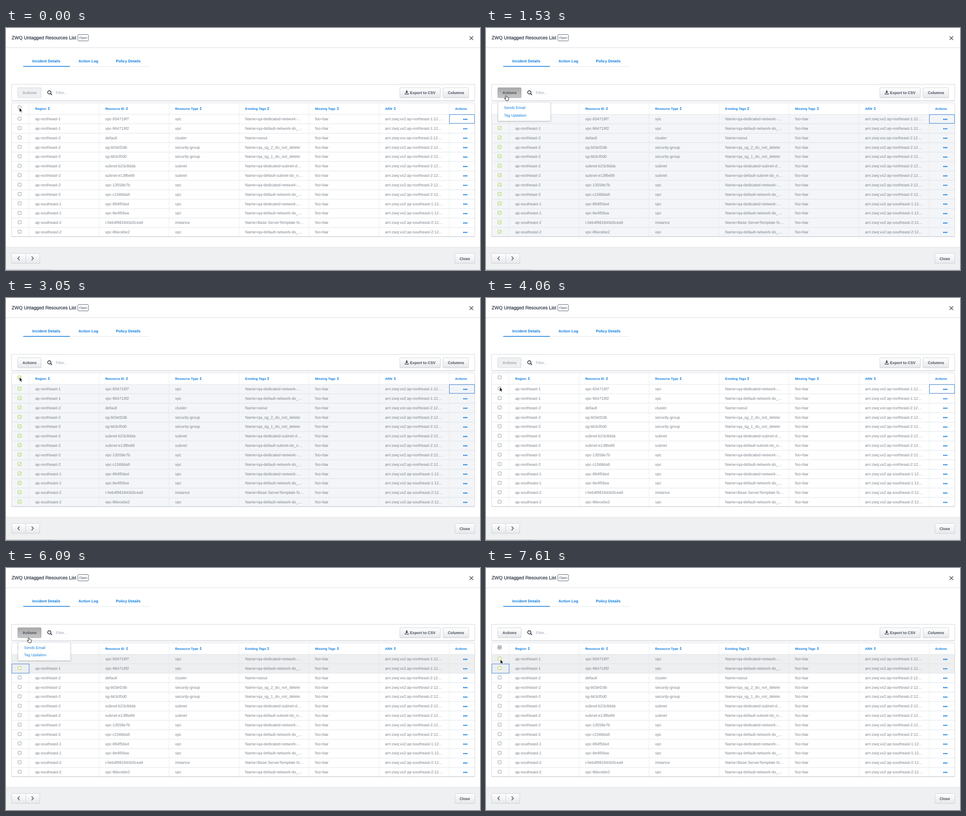
These frames come from a looping animation (1046 px wide and 535 px high, 8000 ms). An HTML page:

```html
<!DOCTYPE html>
<html lang="en">
<head>
<meta charset="utf-8">
<title>Untagged Resources</title>
<style>
html, body { margin: 0; width: 100%; height: 100%; overflow: hidden; background: #fff; }
svg { display: block; width: 100%; height: 100%; }
text { font: 8.67px "Liberation Sans", Arial, sans-serif; fill: #7b818a; text-rendering: geometricPrecision; }
.b { font-size: 8.4px; font-weight: bold; fill: #454d5a; }
.h { font-size: 7.2px; font-weight: bold; }
.blue { fill: #0a7be0; }
</style>
</head>
<body>
<svg id="stage" viewBox="0 0 1046 535">
<defs>
  <linearGradient id="raised" x2="0" y2="1"><stop stop-color="#fff"/><stop offset="1" stop-color="#e6e8eb"/></linearGradient>
  <linearGradient id="pressed" x2="0" y2="1"><stop stop-color="#a9a9aa"/><stop offset="1" stop-color="#c6c6c7"/></linearGradient>
  <filter id="shadow" x="-10%" y="-20%" width="120%" height="150%"><feDropShadow dx="0" dy="1" stdDeviation="1.5" flood-opacity=".22"/></filter>
</defs>
</svg>
<script>
const stage = document.getElementById('stage');
const TOP = 191, STEP = 20.83, LEFT = 12.5, RIGHT = 1034.5, COL = 154.4;
const BORDER = '#d3d7dc', BLUE = '#0a7be0', GREEN = '#96c83c';

const text = (x, y, s, attrs = '') => `<text x="${x}" y="${y}" ${attrs}>${s}</text>`;
const rect = (x, y, w, h, fill, stroke = 'none', attrs = '') =>
  `<rect x="${x}" y="${y}" width="${w}" height="${h}" fill="${fill}" stroke="${stroke}" ${attrs}/>`;
const path = (d, stroke, attrs = '') => `<path d="${d}" fill="none" stroke="${stroke}" ${attrs}/>`;
const button = (x, y, w, h = 22) =>
  rect(x, y + .6, w, h, '#c3c7cd', 'none', 'rx="1.5"') + rect(x, y, w, h, 'url(#raised)', '#cfd3d8', 'rx="1.5"');
const group = id => `<g id="${id}"></g>`;

const tags = {
  net: 'Name=qa-dedicated-network-…', def: 'Name=qa-default-network-do_…',
  sub: 'Name=qa-dedicated-subnet-d…', dsub: 'Name=qa-default-subnet-do_n…'
};
const rows = [
  ['northeast-1', 'vpc-934719f7', 'vpc', tags.net],
  ['northeast-1', 'vpc-964719f2', 'vpc', tags.def],
  ['northeast-2', 'default', 'cluster', 'Name=seoul', 'vxs'],
  ['northeast-2', 'sg-b03ef2db', 'security-group', 'Name=qa_sg_2_do_not_delete'],
  ['northeast-2', 'sg-bb3cf0d0', 'security-group', 'Name=qa_sg_1_do_not_delete'],
  ['northeast-2', 'subnet-b23c8dda', 'subnet', tags.sub],
  ['northeast-2', 'subnet-e13f8e89', 'subnet', tags.dsub],
  ['northeast-2', 'vpc-13558e7b', 'vpc', tags.net],
  ['northeast-2', 'vpc-c1568da9', 'vpc', tags.def],
  ['southeast-1', 'vpc-894f56ed', 'vpc', tags.net],
  ['southeast-1', 'vpc-8e4f56ea', 'vpc', tags.def],
  ['southeast-2', 'i-0eb4f981840d3cea9', 'instance', 'Name=Base ServerTemplate fo…'],
  ['southeast-2', 'vpc-86ecebe2', 'vpc', tags.def]
];
const headings = [['Region', 94.5], ['Resource ID', 267], ['Resource Type', 429.5],
  ['Existing Tags', 578.5], ['Missing Tags', 732.5], ['ARN', 858]];

function pageHeader() {
  return text(12.5, 25.4, 'ZWQ Untagged Resources List',
      'style="font-size:10.3px;fill:#333c4b;stroke:#333c4b;stroke-width:.3px"')
    + rect(158.5, 14.5, 23.5, 14, '#fff', '#5d6778', 'rx="2"')
    + text(161.6, 24.4, 'Open', 'style="font-size:7.2px;fill:#3f4858"')
    + path('M1023 18.5l8 8m0-8l-8 8', '#3f4858', 'stroke-width="1.3"')
    + path('M0 43.5H1046', '#d8dbdf')
    + ['Incident Details', 'Action Log', 'Policy Details'].map((s, i) =>
        text([58, 160, 242.5][i], 75.7, s, 'class="b blue"')).join('')
    + path('M38 85H317', '#e3e5e8') + path('M38 84.7H141', BLUE, 'stroke-width="1.5"');
}

function toolbar() {
  return rect(LEFT, 124.5, RIGHT - LEFT, 36.5, '#fff', BORDER)
    + path('M13 161H1034', '#c9cdd2') + group('actions')
    + '<circle cx="95.6" cy="142.2" r="3.6" fill="none" stroke="#3c4350" stroke-width="1.7"/>'
    + path('M98.2 144.8L101.4 148', '#3c4350', 'stroke-width="2"')
    + text(110, 146.2, 'Filter...', 'style="font-size:8.4px;fill:#a0a5ab"')
    + button(869, 132, 89.5) + text(891.5, 146.1, 'Export to CSV', 'class="b"')
    + '<path d="M883 138h2.6v3.4h2.2l-3.5 3.4l-3.5-3.4h2.2z" fill="#454d5a"/>'
    + path('M880.6 144v2.4h7.4v-2.4', '#454d5a', 'stroke-width="1.2"')
    + button(964.5, 132, 56.5) + text(975, 146.1, 'Columns', 'class="b"');
}

function table() {
  let s = group('bands') + path(`M${LEFT} 165.5H${RIGHT}V461.5H${LEFT}Z`, BORDER);
  for (let i = 0; i < 7; i++) {
    const x = i < 6 ? 51 + COL * i : 978;
    s += path(`M${x.toFixed(1)} 166V461`, '#e4e7ea', 'stroke-width=".8"');
  }
  headings.forEach(([name, x], i) => {
    s += text(64.5 + COL * i, 180.7, name, 'class="h blue"')
      + `<path d="M${x - 2.2} 177.4h4.4l-2.2-2.6zm0 1.6h4.4l-2.2 2.6z" class="blue"/>`;
  });
  s += text(991, 180.7, 'Actions', 'class="h blue"');
  rows.forEach(([region, id, type, tag, service = 'vx2'], i) => {
    const y = TOP + STEP * i;
    s += path(`M13 ${y.toFixed(1)}H1034`, '#dde0e4', 'stroke-width=".9"');
    ['ap-' + region, id, type, tag, 'foo=bar', `arn:zwq:${service}:ap-${region}:12…`].forEach((cell, c) => {
      s += text(64.5 + COL * c, y + 13.1, cell);
    });
    for (let d = 0; d < 3; d++)
      s += `<circle cx="${1010.2 + d * 3.3}" cy="${y + 11}" r="1.4" class="blue"/>`;
  });
  return s + path('M13 461H1034', '#c9cdd2') + group('marks');
}

function footer() {
  return rect(0, 485, 1046, 50, '#eff0f2') + path('M0 484.7H1046', '#dfe2e5')
    + button(12.5, 498.5, 31) + button(43.5, 498.5, 31) + button(991, 498.5, 43.5)
    + path('M30 505l-4 4.3l4 4.3M56.5 505l4 4.3l-4 4.3', '#3f4858', 'stroke-width="1.4"')
    + text(1001, 512.6, 'Close', 'class="b"') + group('edge');
}

stage.innerHTML += pageHeader() + toolbar() + table() + footer() + group('menu') + group('cursor');

function checkbox(y, mark) {
  const color = mark === 'minus' ? '#3c4350' : mark ? GREEN : '#8a919b';
  return rect(26.5, y - 3.5, 7, 7, '#fff', color, 'rx=".7" stroke-width=".9"')
    + (mark === 'check' ? path(`M28 ${y}l1.5 1.6l2.8-3.2`, GREEN) : '')
    + (mark === 'minus' ? path(`M28 ${y}h4`, color, 'stroke-width="1.4"') : '');
}

function actionsButton(level) {
  const face = level === 2
    ? rect(26, 132, 51.5, 22, 'url(#pressed)', '#a4a6a9', 'rx="1.5"')
    : level ? button(26, 132, 51.5) : rect(26, 132, 51.5, 22, '#eff0f2', '#d6d9dd', 'rx="1.5"');
  return face + text(36.6, 146.1, 'Actions', `class="b" ${level ? '' : 'style="fill:#a0a6ae"'}`);
}

function menu(open) {
  if (!open) return '';
  const settle = open === 2 ? 1 : 0;
  const bottom = 204.5 + settle;
  return `<g opacity="${settle ? 1 : .95}"><path d="M26.5 164.5H36l4-4l4 4H142.5V${bottom}H26.5Z"
    fill="#fff" stroke="#d2d5d9" stroke-width=".8" filter="url(#shadow)"/>`
    + text(39.8, 178.7, 'Sends Email', 'class="blue" style="font-size:8.4px"')
    + text(39.8, 195.4 + settle, 'Tag Updation', 'class="blue" style="font-size:8.4px"') + '</g>';
}

function cursor(x, y, hand) {
  const d = hand
    ? 'M3 .7Q4.2 0 4.7 1L5.4 3.8Q6.4 3 7 4Q8.2 3.5 8.6 4.5Q9.8 4.4 9.9 5.6L9.4 9L8.6 11.3H4.2L.7 7.4Q.2 6.2 1.4 6.1L3.3 7.2L2.4 2Q2.3 1 3 .7Z'
    : 'M0 0V9.2L2.1 7.3L3.5 10.6L5.1 9.9L3.7 6.7H6.6Z';
  return `<path d="${d}" transform="translate(${x} ${y})" fill="${hand ? '#fff' : '#000'}"
    stroke="${hand ? '#000' : '#fff'}" stroke-width="${hand ? .9 : .7}"/>`;
}

// start ms, cursor x, y, hand, selected rows, button level, menu stage
const steps = [
  [0, 29.6, 176.5, 0, 0, 0, 0],
  [510, 29.6, 176.5, 0, 13, 1, 0],
  [1020, 42, 151, 1, 13, 1, 0],
  [1530, 40.3, 149.3, 1, 13, 2, 2],
  [2040, 40.3, 149.3, 1, 13, 2, 2],
  [2540, 38.6, 153.5, 1, 13, 2, 0],
  [3050, 29.8, 175.3, 0, 13, 1, 0],
  [3550, 29.8, 192.3, 0, 0, 0, 0],
  [4060, 30.2, 197.3, 0, 0, 0, 0],
  [4570, 28.4, 221, 0, 1, 1, 0],
  [5080, 45, 163.3, 0, 2, 1, 0],
  [5590, 46.3, 154, 1, 2, 1, 0],
  [6090, 46.3, 154, 1, 2, 2, 1],
  [6600, 46.3, 154, 1, 2, 2, 2],
  [7110, 44, 157, 1, 2, 2, 0],
  [7610, 31.8, 202.4, 0, 2, 1, 0]
];

function draw(step) {
  const [time, x, y, hand, selected, level, open] = step;
  const all = selected === rows.length, single = time >= 4570;
  const set = (id, html) => { document.getElementById(id).innerHTML = html; };

  set('bands', rect(13, TOP, 1021, STEP * selected, all ? '#f3f5f8' : '#eeeff1'));
  const focus = single
    ? rect(13, TOP + STEP * (selected - 1) + .3, 38, 20.4, 'none', '#4285d6')
    : rect(978.5, 191.5, 55.5, 19.3, 'none', '#3f82d2');
  set('marks', focus + checkbox(175.5, all ? 'check' : selected ? 'minus' : '')
    + rows.map((_, i) => checkbox(TOP + STEP * i + 9.4,
        i < selected ? (all ? 'check' : 'green') : '')).join(''));
  set('actions', actionsButton(level));
  set('menu', menu(open));
  set('edge', single ? path('M0 534.5H1046', '#fafafa')
    : path('M0 534.5H1046', '#d9dbde') + path('M0 534.5H104', '#b9bbbe'));
  set('cursor', cursor(x, y, hand));
}

let shown;
function tick() {
  const t = performance.now() % 8000;
  const step = steps.findLast(s => s[0] <= t);
  if (step !== shown) draw(shown = step);
  requestAnimationFrame(tick);
}
tick();
</script>
</body>
</html>
```
